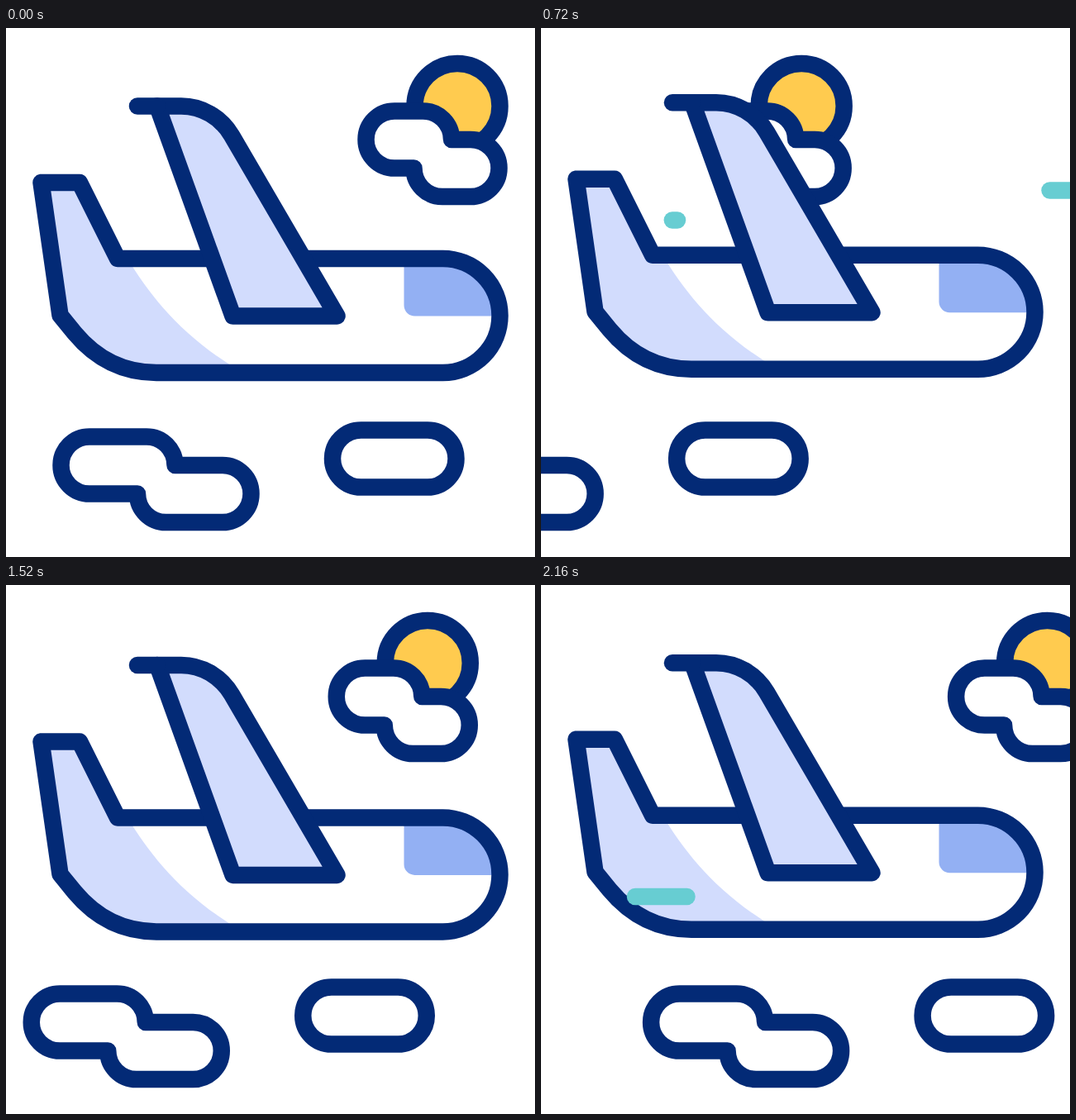
An HTML page that plays this animation: 640x640 px, repeating every 2.2 s.

```html
<!DOCTYPE html>
<html lang="en">
<head>
<meta charset="utf-8">
<title>Plane in the clouds</title>
<style>
  html, body { margin: 0; width: 100%; height: 100%; overflow: hidden; background: #fff; }
  svg { display: block; width: 100vw; height: 100vh; }
  .line { stroke: #032a76; stroke-width: 20.5; stroke-linecap: round; stroke-linejoin: round; }
  .white { fill: #fff; }
  .pale { fill: #d2dcfd; }
  .wind { stroke: #67cdd2; stroke-width: 20.5; stroke-linecap: round; }
</style>
</head>
<body>
<svg viewBox="0 0 640 640">
  <defs>
    <g id="sky">
      <circle class="line" cx="546" cy="94.5" r="51.5" fill="#ffcb4f"/>
      <path class="line white" d="M470 100.5H504.5A34.5 34.5 0 0 1 539 135H562A34.5 34.5 0 0 1 562 204H528A34.5 34.5 0 0 1 493.5 169.5H470A34.5 34.5 0 0 1 470 100.5Z"/>
      <path class="line white" d="M101 494.5H170A34.5 34.5 0 0 1 204.5 529H262A34.5 34.5 0 0 1 262 598H193.5A34.5 34.5 0 0 1 159 563.5H101A34.5 34.5 0 0 1 101 494.5Z"/>
      <rect class="line white" x="395" y="486.5" width="149.5" height="69" rx="34.5"/>
    </g>
  </defs>
  <use id="leaving" href="#sky"/>
  <use id="coming" href="#sky"/>
  <g id="plane">
    <path class="white" d="M135 279H528.5A69 69 0 0 1 528.5 417H182L100 340Z"/>
    <path class="pale" d="M42.5 187H89L135 279H147C175 325 215 376 287 417H182C141 417 108 399 83 369L65.5 347.5Z"/>
    <path fill="#93b0f3" d="M481.5 279H528.5A69 69 0 0 1 597.5 348.5H494.5A13 13 0 0 1 481.5 335.5Z"/>
    <path class="line" fill="none" d="M42.5 187H89L135 279H528.5A69 69 0 0 1 528.5 417H182C141 417 108 399 83 369L65.5 347.5Z"/>
    <path class="line pale" d="M183 94.5H212C237 94.5 260 108 273 130L400.5 348.5H274.5Z"/>
    <path class="line" d="M159 94.5H183"/>
  </g>
  <g id="winds"></g>
</svg>
<script>
  // Times below are counted in steps of 40 ms.
  const STEP = 40, STEPS = 55;
  const CYCLE = 27, CALM = 15;
  const BEAT = 11;

  const gusts = [
    { y: 196.5, from: 660, to: 162, start: 17, speed: 44.5, lag: 4.87 },
    { y: 232.5, from: 165, to: 30, start: 17.6, speed: 15.4, lag: 2.8 },
    { y: 377, from: 561, to: 114, start: 41.9, speed: 44.5, lag: 4.1 },
    { y: 448.5, from: 111, to: -24, start: 41.8, speed: 15.4, lag: 2.8 }
  ];

  const byId = id => document.getElementById(id);
  const move = (id, x, y) => byId(id).setAttribute('transform', `translate(${x} ${y})`);
  const smooth = u => u * u * (3 - 2 * u);

  for (const gust of gusts) {
    gust.el = document.createElementNS('http://www.w3.org/2000/svg', 'line');
    gust.el.setAttribute('class', 'wind');
    gust.el.setAttribute('y1', gust.y);
    gust.el.setAttribute('y2', gust.y);
    byId('winds').append(gust.el);
  }

  // The sky drifts slowly, then rushes out while its next copy rushes in.
  function drawSky(k) {
    const start = k < CYCLE ? 0 : CYCLE;
    const end = start ? STEPS : CYCLE;
    const age = k - start;
    move('leaving', -3.25 * Math.min(age, CALM) - 60.7 * Math.max(0, age - CALM), 0);
    move('coming', 66.6 * (end - k), 0);
  }

  // Eased swings down and up, at rest at both ends of the loop.
  function drawPlane(k) {
    const level = i => i % 5 ? (i % 2 ? 13.2 : -11.8) : 0;
    const i = Math.floor(k / BEAT);
    move('plane', 0, level(i) + (level(i + 1) - level(i)) * smooth(k / BEAT - i));
  }

  // The tail sets off later than the head and is a little faster.
  function drawGust({ el, from, to, start, speed, lag }, k) {
    const at = (t, v) => Math.max(to, from - v * Math.max(0, k - t));
    const head = at(start, speed), tail = at(start + lag, speed * 1.08);
    el.setAttribute('x1', head);
    el.setAttribute('x2', tail);
    el.style.display = head < tail ? '' : 'none';
  }

  function draw(k) {
    drawSky(k);
    drawPlane(k);
    gusts.forEach(gust => drawGust(gust, k));
  }

  const begin = performance.now();
  function tick() {
    draw(Math.floor((performance.now() - begin) / STEP) % STEPS);
    requestAnimationFrame(tick);
  }
  draw(0);
  requestAnimationFrame(tick);
</script>
</body>
</html>
```
